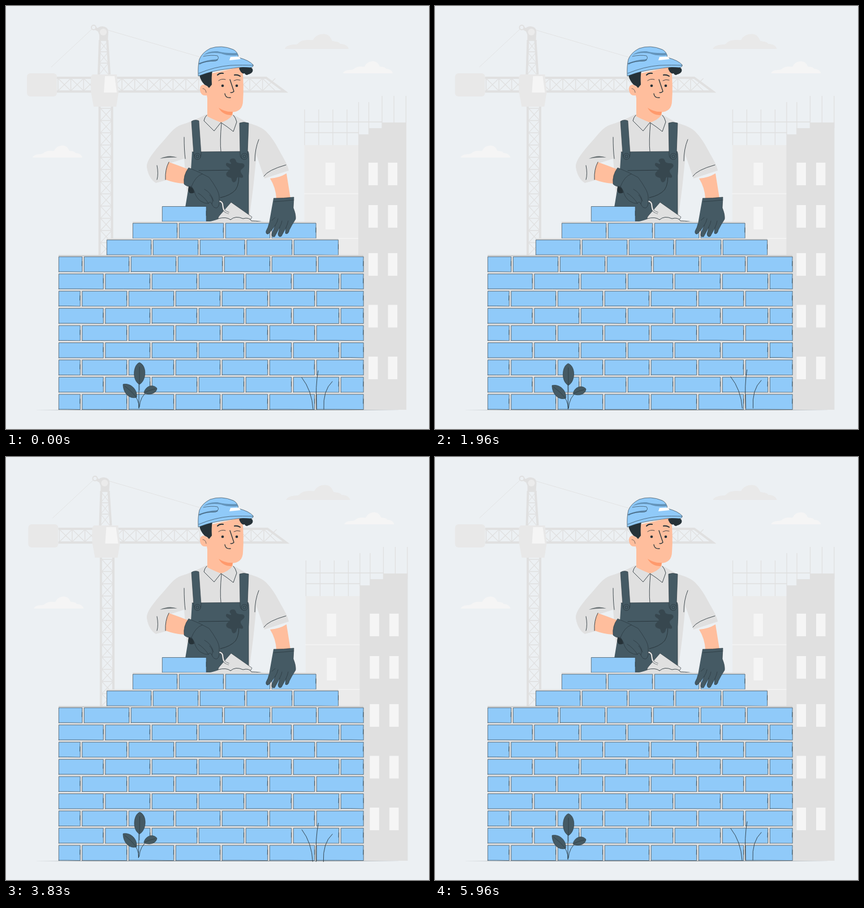
An HTML page for the animation above (6 s loop, 748 by 748 pixels).

```html
<!DOCTYPE html>
<html lang="en">
<head>
<meta charset="utf-8">
<title>Bricklayer</title>
<style>
  html, body { margin: 0; width: 100%; height: 100%; overflow: hidden; background: #ecf0f3; }
  svg { display: block; width: 100vw; height: 100vh; }
  .ln { fill: none; stroke: #263238; stroke-width: .85; stroke-linecap: round; stroke-linejoin: round; }
  .fine { stroke-width: .6; }
  .bold { stroke-width: 1.3; }
  .edge { stroke: #263238; stroke-width: .6; stroke-linejoin: round; }
  .skin { fill: #ffbe9d; }
  .cloth { fill: #e0e0e0; }
  .denim { fill: #455a64; }
  .dark { fill: #263238; }
  .blue { fill: #90caf9; }
</style>
</head>
<body>
<svg viewBox="0 0 748 748">
  <g id="back">
    <path d="M493 76c1-5 10-8 20-8 5-1 5-6 13-7 8-2 12 0 17-1 3-7 13-12 22-10 7 1 9 6 12 12 7 1 12 1 14 5 9 0 14 4 15 9z" fill="#e9e9e9"/>
    <g fill="#f5f5f5">
      <path id="cloud" d="M596 119c1-4 7-6 14-6 5 0 6-4 11-5 5-2 9 0 13-1 3-6 9-10 17-9 6 1 8 5 10 9 5 1 8 0 11 4 7 0 11 4 12 8z"/>
      <use href="#cloud" transform="translate(-549 149)"/>
    </g>
    <g id="crane" fill="none" stroke="#e0e0e0"></g>
    <g fill="none" stroke="#e0e0e0">
      <path d="M155 38L80 108M178 42L346 91" stroke-width=".8"/>
      <path d="M155 38l15 8" stroke-width="5"/>
      <circle cx="155" cy="38" r="4" fill="#ecf0f3" stroke-width="2"/>
    </g>
    <path d="M161 41q2-5 10-5 10 1 10 10l-1 15h-15v-10z" fill="#e0e0e0"/>
    <circle cx="172" cy="46" r="6" fill="#ebebeb"/>
    <g fill="#e8e8e8">
      <rect x="37" y="119" width="53" height="41" rx="6"/>
      <path d="M153 121h43l3 32-4 25h-40l-5-27V125z"/>
    </g>
    <path d="M175 124h17l4 29h-23z" fill="#f5f5f5"/>
    <path id="scaffold" fill="none" stroke="#e0e0e0" stroke-width="1.3"/>
    <rect x="527.500" y="246" width="97" height="468" fill="#ebebeb"/>
    <path d="M527 332h97M527 411h97" stroke="#f5f5f5" stroke-width="1.5"/>
    <path d="M623 714V227h18v-11h24v-10h43v508z" fill="#e0e0e0"/>
    <g id="windows" fill="#f5f5f5"></g>
  </g>

  <!-- worker -->
  <g>
    <path class="cloth" d="M353 192Q328 205 310 210C297 214 288 228 277 240C262 257 248 273 249 285C251 299 257 308 265 313L283 308 290 278 315 270 322 356 430 376Q438 320 443 264L457 305 500 291C499 282 490 268 483 255Q472 234 461 223Q452 213 428 207L404 193z"/>
    <path class="skin" d="M356 130L356 195Q365 200 380 206Q394 202 401 192L401 180z"/>
    <path class="ln" d="M355 193Q351 197 350 203L368 221 380 206Q391 213 402 222L408 205Q406 197 402 193M381 207Q378 240 380 257M315 232Q315 255 317 270M447 236Q440 253 440 274M456 301Q463 290 495 281M267 282Q270 297 267 307"/>
    <path d="M272 270q17-8 31-2-13-1-31 2z" class="dark" opacity=".65"/>
    <path class="denim" d="M329 258L428 257Q431 260 429 300L429 381H354V356H317Q321 330 326 306z"/>
    <path class="ln fine" d="M329 258L428 257Q431 260 429 300V380"/>
    <path class="denim edge" d="M328 204Q334 200 341 203L345 261Q345 270 339 271 333 271 332 262zM413 207Q420 204 429 207L427 262Q426 271 420 271 414 270 414 262z"/>
    <g class="denim edge"><circle cx="338.500" cy="266" r="5.500"/><circle cx="421.500" cy="266" r="5.500"/><circle cx="338.500" cy="266" r="2.500"/><circle cx="421.500" cy="266" r="2.500"/></g>
    <path class="ln" d="M341 291L411 290Q414 313 406 325 397 335 379 339"/>
    <path fill="#37474f" d="M396 272C400 268 406 269 407 275 410 280 418 276 421 280 424 285 417 287 415 291 414 296 421 299 419 303 415 306 411 299 408 305 407 313 400 314 399 307 399 302 392 304 390 300 387 294 395 292 396 288 394 284 388 284 389 279 391 275 397 281 398 279 399 276 394 276 396 272z"/>

    <!-- head -->
    <path class="skin" d="M360 120L418 107Q421 144 419 168Q419 187 398 188 376 186 357 168L355 158Q345 160 343 149 342 140 349 139 356 140 358 147z"/>
    <path d="M376 180Q388 188 401 187Q400 191 399 193Q383 193 376 180z" fill="#ff9a6c"/>
    <path class="dark" d="M342 122L365 114Q363 125 364 139L359 145Q356 141 351 139 344 132 342 122zM412 110C418 107 430 106 435 110C439 115 434 120 428 121C427 123 423 122 422 119C418 121 414 116 412 110z"/>
    <path class="ln fine" d="M348 146q5 0 6 7"/>
    <path class="ln" d="M374 122Q378 118 384 119M404 122Q409 121 414 124" style="stroke-width:2"/>
    <path class="ln" d="M376 132Q381 128 388 130M403 132Q408 129 414 131"/>
    <path class="ln bold" d="M396 130L403 151Q400 154 397 153M387 155Q388 163 397 162"/>
    <circle class="dark" cx="383" cy="141" r="2.300"/><circle class="dark" cx="408" cy="141" r="2.300"/>
    <path class="blue edge" d="M340 124Q339 106 342 94Q347 82 361 75Q381 68 402 77Q410 81 411 91Q430 96 437 104Q438 108 432 109Q413 107 394 111Q365 114 340 124z"/>
    <path d="M349 87Q358 79 374 80 389 84 408 83L411 87Q393 89 380 84 363 81 349 87zM342 101Q354 95 374 94L375 96Q371 98 361 98 350 99 342 104z" fill="#6494ba"/>
    <path class="ln fine" d="M349 89Q363 86 374 88 378 93 371 97 354 97 341 102M341 119Q370 107 397 105 420 104 437 105"/>
    <path d="M397 90L412 89.500 415 94 395 96z" fill="#fff"/>

    <!-- near forearm and trowel -->
    <path class="skin" d="M288 276Q305 282 323 289L315 314Q298 313 282 307 281 289 288 276z"/>
    <path class="ln" d="M288 276Q281 289 282 307"/>
    <path class="cloth edge" d="M398 347L435 373 433 377 375 378Q374 374 378 370z"/>
    <path d="M375 346q6-2 8 4c1 7 0 13 11 16" fill="none" stroke="#263238" stroke-width="3.400"/>
    <path d="M375 346q6-2 8 4c1 7 0 13 11 16" fill="none" stroke="#e0e0e0" stroke-width="2.400"/>
    <path class="cloth" d="M356 382Q372 379 379 375 390 372 397 378 407 370 420 376 429 373 433 379 448 380 462 384z"/>
    <path class="ln" d="M375 376Q390 372 397 378 406 370 419 376 430 373 434 380 450 380 462 384"/>
    <path class="dark" d="M323 318l8 4 2 8q-9 4-11-4z"/>
    <path class="denim edge" d="M323 286Q343 294 359 303 366 312 371 321 378 332 377 342 378 354 373 357 367 358 364 350 361 344 358 349 352 350 344 345 335 338 333 327L328 319Q320 320 315 315 313 299 323 286z"/>
    <path class="ln fine" d="M347 297Q335 301 328 319M364 350Q368 342 360 334M351 324Q363 330 367 345M340 331Q350 337 358 349"/>
    <path class="skin" d="M467 305Q483 304 496 296L503 340H478Q477 321 467 305z"/>
  </g>

  <g id="wall"></g>
  <path d="M48 714.200Q374 713.600 700 714.200 374 715 48 714.200z" fill="#263238"/>

  <!-- far glove -->
  <path class="denim edge" d="M473 340Q490 340 509 338L508 357Q513 369 512 377 506 386 501 396 499 405 494 402 494 397 495 392 491 400 487 407 482 410 481 403 483 397 484 391 479 401 475 408 469 409 470 403 473 395 476 388 470 397 464 403 459 404 460 398 464 391 465 385 470 379L457 384Q460 377 471 373 476 366 476 358z"/>
  <path class="ln fine" d="M474 346Q492 345 509 343M484 391Q487 386 488 380M495 392Q498 386 499 380M476 388Q480 382 481 376M470 379L476 374"/>

  <g id="plants">
    <path class="ln" d="M235 711V650M235 711Q236 694 222 684M236 709Q237 690 251 681"/>
    <g class="denim edge">
      <path d="M236 630.500C250 636 248 663 236 669 223 663 224 635 236 630.500z"/>
      <path d="M207 669C219 666 233 677 231 692 217 696 207 683 207 669z"/>
      <path d="M244 684C246 673 259 667 267 676 266 686 252 689 244 684z"/>
    </g>
    <path class="ln fine" d="M236 638V680M210 672Q222 681 230 691M264 677Q254 679 246 683"/>
    <path class="ln" d="M523 657Q541 680 543 713M549 713Q547 670 552 645M562 713Q560 680 577 664"/>
  </g>
</svg>
<script>
const NS = "http://www.w3.org/2000/svg";
const $ = id => document.getElementById(id);

function add(parent, tag, attrs) {
  const el = document.createElementNS(NS, tag);
  for (const k in attrs) el.setAttribute(k, attrs[k]);
  parent.append(el);
}

let seed = 11;
const rand = () => (seed = seed * 16807 % 2147483647) / 2147483647;

// Crane: crossed braces inside pairs of chords
function drawCrane() {
  const crane = $("crane");
  const bay = (x1, y1, x2, y2) => `M${x1} ${y1}L${x2} ${y2}M${x2} ${y1}L${x1} ${y2}`;
  let braces = "", bars = "";
  for (let y = 181; y < 440; y += 21.6) {
    braces += bay(167, y, 187, y + 21.6);
    bars += `M166 ${y}H188`;
  }
  for (let i = 0; i < 3; i++) {
    const y = 61 + i * 20;
    braces += bay(165, y, 181, y + 20);
    bars += `M165 ${y}H181`;
  }
  for (let x = 92; x < 455; x += 22.6) {
    braces += bay(x, 128, x + 22.6, 150);
    bars += `M${x} 127V151`;
  }
  add(crane, "path", { d: braces, "stroke-width": 1.2 });
  add(crane, "path", { d: bars, "stroke-width": 1.5 });
  add(crane, "path", {
    d: "M165.500 178V441M187.500 178V441M90 127H460L493 151.300H90M166 60L164 121M179 60L183 121",
    "stroke-width": 4
  });
}

function drawBuildings() {
  let d = "M528 205H665M528 224H623";
  for (const x of [528, 553, 578, 603]) d += `M${x} 183V246`;
  for (const x of [623.5, 641.5]) d += `M${x} 170V228`;
  for (const x of [665, 686, 707.3]) d += `M${x} 159V216`;
  $("scaffold").setAttribute("d", d);
  const pane = (x, y) => add($("windows"), "rect", { x, y, width: 16.5, height: 40 });
  for (const y of [277, 352, 437, 528.5, 620]) [641, 675.5].forEach(x => pane(x, y));
  for (const y of [277, 355]) pane(565, y);
}

// Each row lists the left edges of its bricks, then the end of the row
const A = [93, 175.5, 258, 341, 424, 508, 592, 635.5];
const B = [93, 134.5, 217, 300, 382, 466, 549, 635.5];
const rows = [
  [276, 357.5],
  [224, 306, 388, 470, 551.5],
  [178, 260, 343, 425.5, 509, 591],
  [93, 138, 221, 304, 386, 470, 552, 635.5],
  A, B, A, B, A, B, A, B
];

function drawWall() {
  const wall = $("wall");
  rows.forEach((xs, r) => {
    const y = r < 3 ? 354.5 + r * 29.6 : 443.4 + (r - 3) * 30.42;
    const end = xs[xs.length - 1] - 3.5;
    if (r) add(wall, "rect", { x: xs[0], y: y - 3, width: end - xs[0], height: 30.5, fill: "#e0e0e0" });
    for (let i = 0; i + 1 < xs.length; i++) {
      const x = xs[i] + .3, w = xs[i + 1] - xs[i] - 3.6, h = 26.8;
      const j = () => (rand() * .8).toFixed(2);
      add(wall, "rect", { x, y, width: w, height: h, class: "blue" });
      add(wall, "path", {
        d: `M${x} ${y + h}V${y}H${x + w}L${x + w - j()} ${y + h * .6}M${x + w} ${y + h * .3}V${y + h}L${x + w * .4} ${y + h - j()}H${x}`,
        class: "ln fine"
      });
    }
  });
  add(wall, "path", { d: "M93 441.300H632", stroke: "#a5abae", "stroke-width": .6 });
}

// [time in ms, value] tables
const sway = [[0, 0], [1150, 0], [1900, -1.6], [2290, -1.6], [2860, 5.5], [3350, -3.5],
  [3950, 3], [4800, -1], [5250, 3], [5610, -1.5], [6000, -1.5]];
const wind = [[0, 0], [750, 1], [2250, -1], [3000, 0]];
const smooth = u => (1 - Math.cos(Math.PI * u)) / 2;

function valueAt(table, t, ease = u => u) {
  const i = table.findIndex(k => k[0] > t);
  const [t0, a] = table[i - 1], [t1, b] = table[i];
  return a + (b - a) * ease((t - t0) / (t1 - t0));
}

function frame() {
  const t = (performance.now() - start) % 6000;
  $("back").setAttribute("transform", `translate(${valueAt(sway, t, smooth)} 0)`);
  $("plants").setAttribute("transform", `rotate(${valueAt(wind, t % 3000)} 392 672)`);
  requestAnimationFrame(frame);
}

drawCrane();
drawBuildings();
drawWall();
const start = performance.now();
frame();
</script>
</body>
</html>
```
